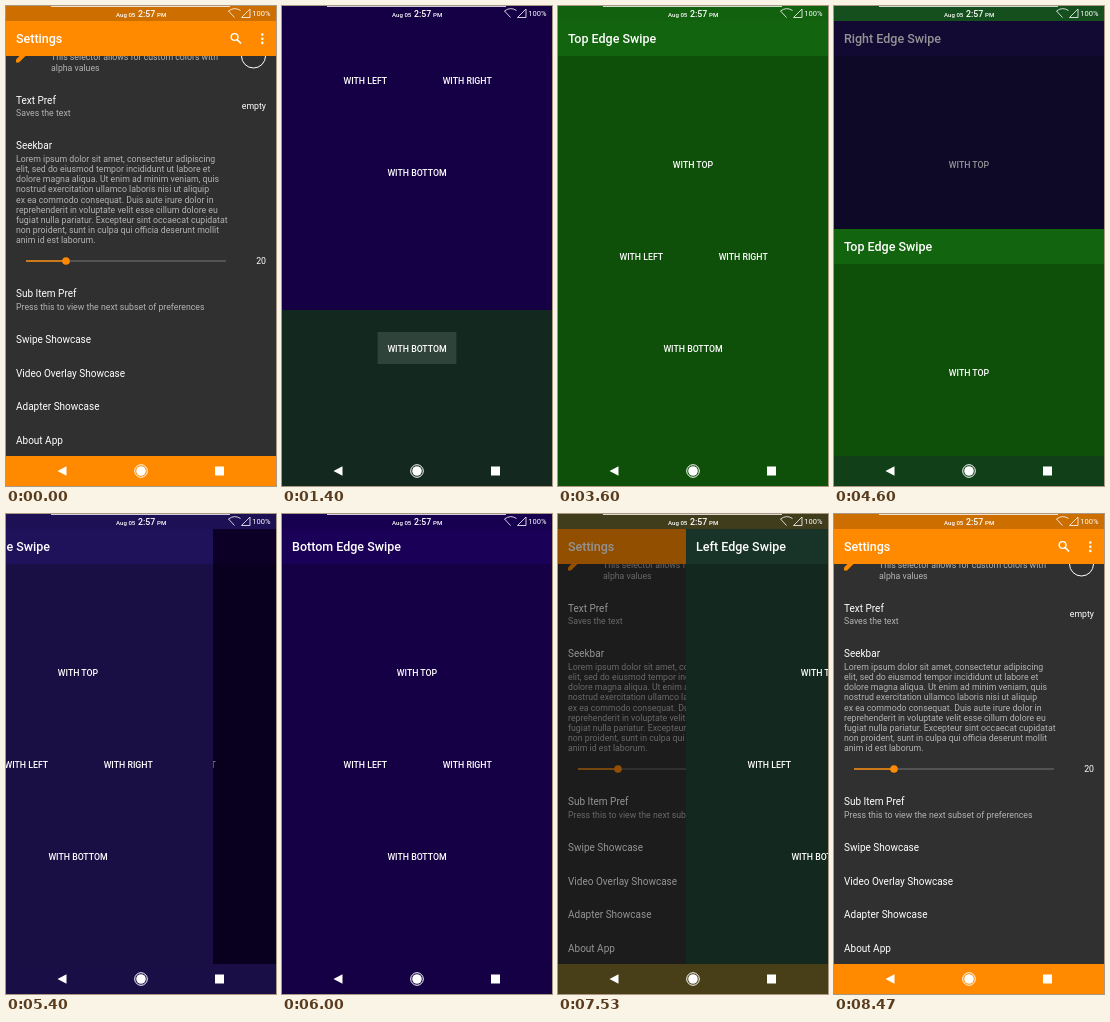
Recreate the animation shown at these times as an HTML page. Size 270x480 px, loop 9140 ms.

```html
<!DOCTYPE html>
<html lang="en">
<head>
<meta charset="utf-8">
<title>Edge swipe showcase</title>
<style>
  html, body { margin: 0; width: 100%; height: 100%; overflow: hidden; background: #303030; }
  #stage { display: block; width: 100%; height: 100%; }
  text { font-family: Roboto, sans-serif; fill: #fff; white-space: pre; }
  .title { font-size: 12.5px; font-weight: 500; }
  .name { font-size: 10px; }
  .note { font-size: 8.75px; fill: #b3b3b3; }
  .value { font-size: 8.75px; text-anchor: end; }
  .button { font-size: 8.75px; font-weight: 500; text-anchor: middle; }
  .clock { font-size: 8.75px; font-weight: 500; }
  .small { font-size: 6.1px; font-weight: 500; }
  .battery { font-size: 7.5px; }
  .line { fill: none; stroke: #fff; }
  .white { fill: #fff; }
</style>
</head>
<body>
<svg id="stage" viewBox="0 0 270 480">
  <defs>
    <clipPath id="content"><rect y="15" width="270" height="435"/></clipPath>
    <clipPath id="list"><rect y="50" width="270" height="400"/></clipPath>
  </defs>
  <g id="screens"></g>
  <g id="system">
    <rect class="white" x="45" width="179" height=".8"/>
    <text class="small" x="110" y="11">Aug 05</text>
    <text class="clock" x="132" y="11">2:57</text>
    <text class="small" x="151" y="11">PM</text>
    <path class="line" stroke-width=".8" d="M234.500 4.500Q228.500 .500 222.500 5L228.500 11.500M235.500 11.500H244V3Z"/>
    <text class="battery" x="246.300" y="9.900">100%</text>
    <path class="white" d="M51.500 465L60.500 460.300V469.700ZM209 460.500H218V469.500H209Z"/>
    <circle class="white" cx="135" cy="465" r="4.800"/>
    <circle class="line" cx="135" cy="465" r="6.300" stroke-width="1"/>
  </g>
</svg>
<script>
const LOOP = 9140, STEP = 1000 / 15, ENTER_TIME = 200;
const root = document.getElementById('screens');

const clamp = v => Math.min(1, Math.max(0, v));
const text = (cls, x, y, s) => `<text class="${cls}" x="${x}" y="${y}">${s}</text>`;
const rect = (x, y, w, h, fill) => `<rect x="${x}" y="${y}" width="${w}" height="${h}" fill="${fill}"/>`;

const mix = (a, b, p) => {
  const parts = c => [1, 3, 5].map(i => parseInt(c.slice(i, i + 2), 16));
  const to = parts(b);
  return `rgb(${parts(a).map((v, i) => Math.round(v + (to[i] - v) * p))})`;
};

const lorem = [
  'Lorem ipsum dolor sit amet, consectetur adipiscing',
  'elit, sed do eiusmod tempor incididunt ut labore et',
  'dolore magna aliqua. Ut enim ad minim veniam, quis',
  'nostrud exercitation ullamco laboris nisi ut aliquip',
  'ex ea commodo consequat. Duis aute irure dolor in',
  'reprehenderit in voluptate velit esse cillum dolore eu',
  'fugiat nulla pariatur. Excepteur sint occaecat cupidatat',
  'non proident, sunt in culpa qui officia deserunt mollit',
  'anim id est laborum.'
];

const settingsBody = `
  <g clip-path="url(#list)">
    <path fill="#ff8a00" d="M10 56.500V53.500L18 45.500L21 48.500L13 56.500Z"/>
    ${text('note', 45, 54.3, 'This selector allows for custom colors with')}
    ${text('note', 45, 64.5, 'alpha values')}
    <circle class="line" cx="247.500" cy="50" r="12" stroke-width="1"/>
    ${text('name', 10, 97.5, 'Text Pref')}
    ${text('note', 10, 109.7, 'Saves the text')}
    ${text('value', 260, 103, 'empty')}
    ${text('name', 10, 143, 'Seekbar')}
    ${lorem.map((s, i) => text('note', 10, 156 + i * 10.15, s)).join('')}
    ${rect(20, 254.5, 200, 1, '#777')}
    ${rect(20, 254.3, 40, 1.4, '#ff8a00')}
    <circle cx="60" cy="255" r="3.800" fill="#ff8a00"/>
    ${text('value', 260, 258.2, '20')}
    ${text('name', 10, 291.3, 'Sub Item Pref')}
    ${text('note', 10, 303.7, 'Press this to view the next subset of preferences')}
    ${['Swipe Showcase', 'Video Overlay Showcase', 'Adapter Showcase', 'About App']
      .map((s, i) => text('name', 10, 337 + i * 33.5, s)).join('')}
  </g>
  <circle class="line" cx="228.600" cy="31" r="3.400" stroke-width="1.400"/>
  <path class="line" stroke-width="1.700" d="M231 33.500L235 37.500"/>
  ${[28.5, 32.7, 36.9].map(y => `<circle class="white" cx="256.300" cy="${y}" r="1.300"/>`).join('')}`;

const edgeBody = [['TOP', 135, 158], ['LEFT', 83.3, 250.3], ['RIGHT', 185.2, 250.3], ['BOTTOM', 135, 342.3]]
  .map(([side, x, y]) => text('button', x, y + 3.6, 'WITH ' + side)).join('');

// dir: direction a screen leaves in; it enters the opposite way.
// exit: [start, end, easing power]; tap: [time, touch x, touch y, box x, y, w, h]
const screens = [
  { title: 'Settings', body: settingsBody, back: '#303030', bar: '#ff8a00',
    colors: { status: '#cc6e00', nav: '#ff8a00' },
    tap: [200, 135, 333, 0, 317, 270, 33] },
  { title: 'Left Edge Swipe', back: '#13281f', bar: '#183327',
    colors: { status: '#162f24', nav: '#13281f' },
    dir: [1, 0], enter: 520, exit: [7240, 8130, 1.6], tap: [1200, 135, 342, 95.5, 326, 79, 32] },
  { title: 'Bottom Edge Swipe', back: '#150046', bar: '#1a0057',
    colors: { status: '#180050', nav: '#150046' },
    dir: [0, -1], enter: 1321, exit: [6300, 7000, 1.53], tap: [2000, 185, 250, 150, 234, 70, 32] },
  { title: 'Right Edge Swipe', back: '#1a0f45', bar: '#20125a',
    colors: { status: '#1e1155', nav: '#1a0f47' },
    dir: [-1, 0], enter: 2320, exit: [5300, 6000, 1.723], tap: [2800, 143, 160, 104, 142, 62, 32] },
  { title: 'Top Edge Swipe', back: '#0e4f0a', bar: '#12640e',
    colors: { status: '#12610e', nav: '#0e4f0a' },
    dir: [0, 1], enter: 2990, exit: [4300, 5200, 1.6] }
];

function rippleMarkup([, touchX, touchY, x, y, w, h]) {
  return `<svg class="ripple" x="${x}" y="${y}" width="${w}" height="${h}">
    <rect class="white press" width="${w}" height="${h}"/>
    <circle class="white wave" cx="${touchX - x}" cy="${touchY - y}" fill-opacity=".09"/></svg>`;
}

for (const s of screens) {
  const g = document.createElementNS('http://www.w3.org/2000/svg', 'g');
  g.innerHTML = `
    <g clip-path="url(#content)"><g class="page">
      ${rect(0, 15, 270, 435, s.back)}${rect(0, 15, 270, 35, s.bar)}
      ${text('title', 10, 37.3, s.title)}${s.tap ? rippleMarkup(s.tap) : ''}${s.body || edgeBody}
      <rect class="scrim" y="15" width="270" height="435" fill-opacity="0"/>
    </g></g>
    <rect class="status" width="270" height="15"/>
    <rect class="nav" y="450" width="270" height="30"/>`;
  root.append(g);
  s.window = g;
  for (const part of ['page', 'scrim', 'status', 'nav', 'ripple', 'press', 'wave'])
    s[part] = g.querySelector('.' + part);
}

const shift = (el, dir, amount, height) =>
  el.setAttribute('transform', `translate(${Math.round(dir[0] * amount * 270)} ${Math.round(dir[1] * amount * height)})`);

function drawRipple(s, t) {
  const age = t - s.tap[0];
  const shown = age > -1 && age < 560;
  s.ripple.style.display = shown ? '' : 'none';
  if (!shown) return;
  const grow = clamp(age / 200);
  s.press.setAttribute('fill-opacity', .04 * grow);
  s.wave.setAttribute('r', 7 + grow * s.tap[5] * .7);
}

function drawSlide(s, below, t) {
  const [start, end, power] = s.exit;
  const left = 1 - (1 - clamp((t - start) / (end - start))) ** power;
  const away = (1 - clamp((t - s.enter) / ENTER_TIME)) ** 2;
  s.window.style.display = away < 1 && left < 1 ? '' : 'none';
  shift(s.window, s.dir, away, 480);
  shift(s.page, s.dir, left, 435);
  below.scrim.setAttribute('fill-opacity', left > 0 ? .66 * (1 - left) ** .68 : 0);
  return left;
}

function draw(t) {
  screens.forEach((s, i) => {
    const below = screens[i - 1] || s;
    const left = i ? drawSlide(s, below, t) : 0;
    for (const bar of ['status', 'nav'])
      s[bar].setAttribute('fill', mix(s.colors[bar], below.colors[bar], left * left));
    if (s.tap) drawRipple(s, t);
  });
}

const began = performance.now();
function tick() {
  const t = (performance.now() - began) % LOOP;
  draw(Math.floor(t / STEP + .1) * STEP);
  requestAnimationFrame(tick);
}
tick();
</script>
</body>
</html>
```
